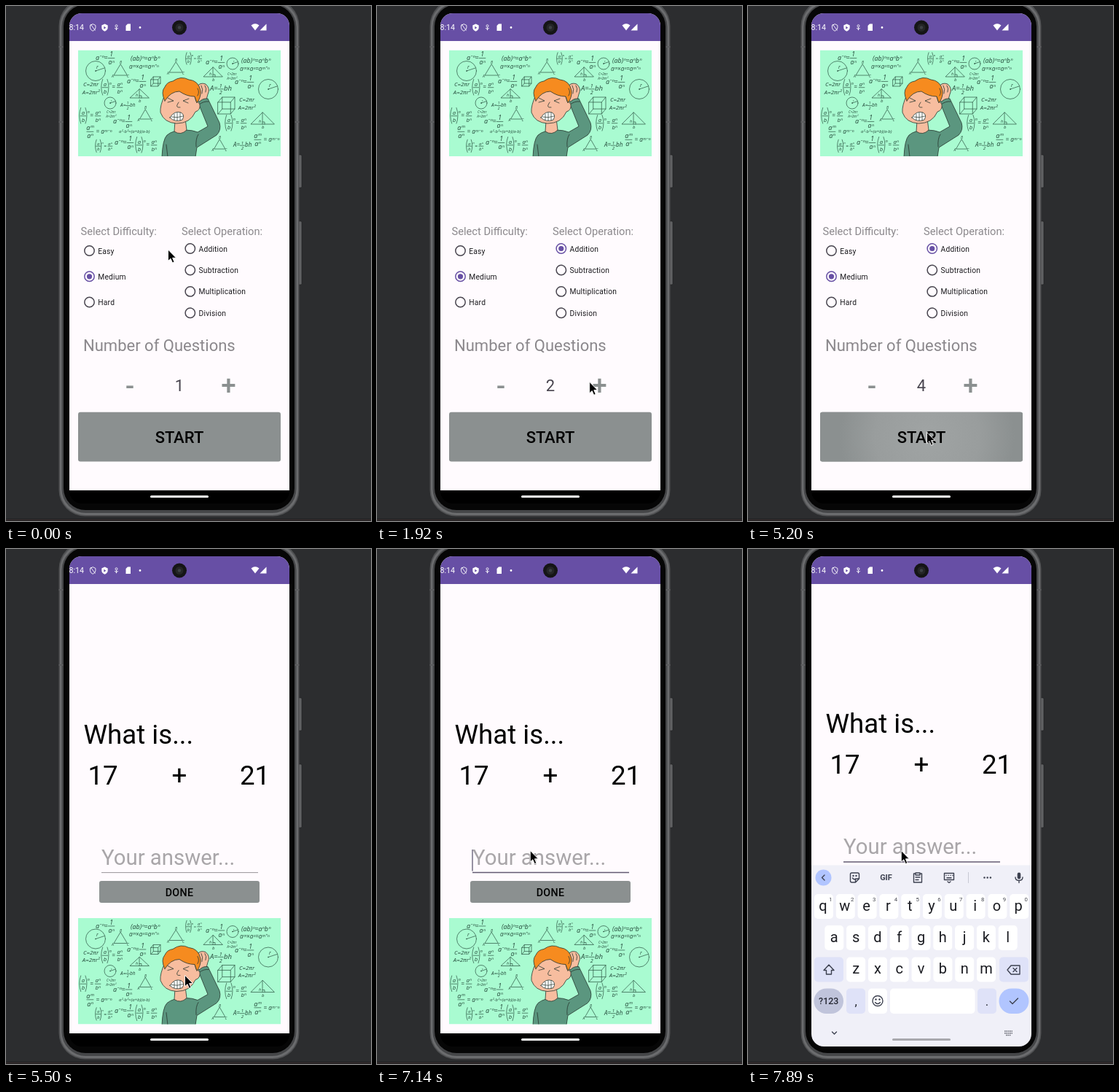
An HTML page that plays this animation: 501 px wide and 706 px high, repeating every 8 s.

```html
<!DOCTYPE html>
<html lang="en">
<head>
<meta charset="utf-8">
<title>Maths quiz</title>
<style>
html, body { margin: 0; width: 100%; height: 100%; overflow: hidden; background: #2c2d2f; }
svg { display: block; width: 501px; height: 706px; font-family: Roboto, sans-serif; }
.mid { text-anchor: middle; }
.m { font-weight: 500; }
.ink { fill: none; stroke: #2a5241; stroke-width: .7; stroke-linecap: round; stroke-linejoin: round; }
.hand { font-family: "Noto Sans", "DejaVu Sans", sans-serif; font-style: italic; font-weight: 300; fill: #2a5241; }
.icon { fill: none; stroke: #3d4150; stroke-width: 1.4; stroke-linecap: round; stroke-linejoin: round; }
.lab { font-size: 10.28px; letter-spacing: .18px; fill: #1c1b1f; }
</style>
</head>
<body>
<svg viewBox="0 0 501 706">
  <defs>
    <clipPath id="screen"><rect x="87" y="10" width="302" height="672" rx="17"/></clipPath>
    <clipPath id="frame"><rect x="99" y="60.5" width="278" height="145.5"/></clipPath>
    <radialGradient id="glow" gradientUnits="userSpaceOnUse" cx="246" cy="591" r="120">
      <stop offset="0" stop-color="#a0a4a4"/><stop offset=".6" stop-color="#999d9d"/><stop offset="1" stop-color="#8b9090"/>
    </radialGradient>
  </defs>

  <rect width="501" height="706" fill="#2c2d2f"/>
  <path d="M0 704.5H501" stroke="#0c0b0b" stroke-width="2"/>
  <path d="M0 704.5H501" stroke="#57494b" stroke-width=".7"/>
  <g fill="#606163" stroke="#1c1c1d" stroke-width=".6">
    <rect x="401" y="204" width="5" height="45" rx="1.5"/>
    <rect x="401" y="295" width="5" height="87" rx="1.5"/>
  </g>
  <rect x="72.500" y="-9" width="330" height="708.500" rx="36" fill="#505153"/>
  <rect x="74" y="-7" width="327" height="705" rx="35" fill="#6b6c6e"/>
  <rect x="76.500" y="-4" width="322" height="699" rx="33" fill="#454648"/>
  <path d="M72.500 56h6M72.500 159h6M396.500 56h6M396.500 159h6" stroke="#5c5d5f" stroke-width="2"/>
  <rect x="79" y="-2" width="317" height="693" rx="30" fill="#060606"/>

  <g clip-path="url(#screen)">
    <rect x="87" y="10" width="302" height="654" fill="#fffbfe"/>
    <g id="setup"></g>
    <g id="quiz"></g>
    <rect x="87" y="10" width="302" height="38" fill="#674fa5"/>
    <g fill="#fff">
      <text x="86.500" y="33" font-size="10.600">8:14</text>
      <path d="M131.300 26.500l4.200-2 4.200 2v3.300q0 3.200-4.200 5-4.200-1.800-4.200-5z"/>
      <path d="M164.500 27l2.500-2.500h4v9.500h-6.500z"/>
      <circle cx="184" cy="29.500" r="1.400"/>
      <path d="M336.500 26.500q5.500-4.500 11 0l-5.500 7z"/>
      <path d="M357.500 24.500v9h-9z"/>
    </g>
    <g fill="none" stroke="#fff" stroke-width=".9">
      <path d="M115.500 26.500l3.700-1.800 3.700 1.800v3.300q0 2.800-3.700 4.500-3.700-1.700-3.700-4.500zM116 25l6.500 8.500"/>
      <circle cx="151.500" cy="27.300" r="1.500"/>
      <path d="M149.300 30a2.300 2.300 0 0 0 4.400 0M151.500 29v4.300"/>
    </g>
    <path d="M134.300 27.800v4l3-2z" fill="#674fa5"/>
    <circle cx="238" cy="29.500" r="10" fill="#151516"/>
    <circle cx="238" cy="29.500" r="5.500" fill="#242526"/>
    <circle cx="238" cy="29.500" r="2.200" fill="#3c4044"/>
    <rect x="87" y="664" width="302" height="18" fill="#000"/>
    <g id="keys"></g>
    <rect id="pill" x="198" y="671" width="80" height="3" rx="1.500" fill="#fff"/>
  </g>
  <path id="cursor" d="M0 0V15.500L3.500 12.300 6 18 8.500 17 6.100 11.300H11Z" fill="#000" stroke="#fff" stroke-width=".9"/>
</svg>

<script>
const $ = id => document.getElementById(id);
const text = (x, y, size, str, attrs = '') => `<text x="${x}" y="${y}" font-size="${size}" ${attrs}>${str}</text>`;
const box = (x, y, w, h, r, fill) => `<rect x="${x}" y="${y}" width="${w}" height="${h}" rx="${r}" fill="${fill}"/>`;
const line = (d, attrs = 'class="ink"') => `<path d="${d}" ${attrs}/>`;
const ring = (x, y, r) => `<circle class="ink" cx="${x}" cy="${y}" r="${r}"/>`;

// Chalkboard formulas: x is the left edge, y the baseline
const hand = (x, y, s, str) => text(x, y, s, str, 'class="hand"');
const frac = (x, y, s, top, bottom) =>
  text(x, y - s * .55, s, top, 'class="hand mid"') + text(x, y + s * .72, s, bottom, 'class="hand mid"') +
  line(`M${x - s * .5} ${y - s * .3}h${s}`);
const inverse = (x, y, s = 9) => hand(x, y, s, 'a⁻ⁿ=') + frac(x + s * 2.4, y, s * .95, '1', 'aⁿ');
const ratio = (x, y, s = 9) =>
  line(`M${x + s * .3} ${y - s * 1.5}q${-s * .45} ${s * 1.2} 0 ${s * 2.4}M${x + s} ${y - s * 1.5}q${s * .45} ${s * 1.2} 0 ${s * 2.4}`) +
  frac(x + s * .65, y, s * .85, 'a', 'b') + hand(x + s * 1.3, y - s * .7, s * .6, 'n') +
  hand(x + s * 1.7, y, s * .9, '=') + frac(x + s * 2.9, y, s * .85, 'aⁿ', 'bⁿ');
const quotient = (x, y, s = 9) => frac(x + s * .6, y, s, 'aᵐ', 'aⁿ') + hand(x + s * 1.5, y, s * .9, '= aᵐ⁻ⁿ');
const half = (x, y, s) => hand(x, y, s, 'A=') + frac(x + s * 1.55, y, s * .75, '1', '2') + hand(x + s * 2, y, s, 'bh');
const powers = (x, y) => hand(x, y, 8.8, '(ab)ⁿ=aⁿbⁿ') + hand(x - 2, y + 10.5, 8, 'aᵐ×aⁿ=aᵐ⁺ⁿ');
const area = (x, y, s) => hand(x, y, s, 'C=2πr') + hand(x - s * .15, y + s * 1.35, s, 'A=2πr²');
const circle = (x, y, r) => ring(x, y, r) + line(`M${x} ${y}l${r * .9} ${-r * .3}`) + ring(x, y, .5) + hand(x + 1, y - r * .25, r * .5, 'r');
const triangle = (x, y, w, h) => line(`M${x} ${y}l${-w / 2} ${h}h${w}z`) +
  hand(x - 1, y - 1, 5, 'B') + hand(x - w / 2 - 3, y + h + 3, 5, 'A') + hand(x + w / 2, y + h + 3, 5, 'C');
const height = (x, y, w, h) => line(`M${x} ${y}l${-w / 2} ${h}h${w}zv${h}m0-3h3v3`) +
  hand(x - 5, y + h - 2, 5.5, 'h') + hand(x - 1, y + h + 6, 6, 'b');
const cube = (x, y, s) => line(`M${x} ${y + s * .3}h${s * .75}v${s * .7}h${-s * .75}zl${s * .25} ${-s * .3}h${s * .75}l${-s * .25} ${s * .3}m${s * .25} ${-s * .3}v${s * .7}l${-s * .25} ${s * .3}M${x + s * .25} ${y}v${s * .7}h${s * .75}M${x + s * .25} ${y + s * .7}l${-s * .25} ${s * .3}`);

const board = '<g clip-path="url(#frame)">' + box(99, 60.5, 278, 145.5, 0, '#a9fbd1') +
  inverse(123, 74) + circle(123, 89, 13.5) + area(106, 110, 7.8) + powers(171, 75) + triangle(157, 80, 18, 15) +
  ratio(130, 114) + inverse(166, 106) + cube(199, 97, 13) + triangle(233, 77, 18, 14) + ratio(246, 74, 6.8) +
  inverse(274, 80) + circle(311, 79, 8) + area(304, 95, 4.6) + powers(323, 78) + height(284, 84, 26, 13) +
  half(280, 116, 9.5) + inverse(314, 107) + circle(360, 114, 13.5) + cube(291, 125, 23) + area(320, 131, 7.8) +
  ratio(300, 163) + height(352, 146, 32, 16) + half(312, 193, 8) + quotient(340, 186) + triangle(293, 183, 15, 13) +
  circle(143, 133, 8) + area(138, 147, 4.6) + half(157, 138, 6.5) + height(183, 114, 26, 12) + inverse(147, 161) +
  triangle(191, 142, 15, 13) + ratio(100, 153) + quotient(110, 175) + hand(155, 174, 6, 'a²-b²=(a+b)(a-b)') +
  ratio(122, 194, 7.2) + inverse(149, 190) + ratio(177, 193) +
  `<g stroke="#28372f" stroke-width=".8" stroke-linejoin="round" stroke-linecap="round">
    <path fill="#f7bd9f" d="M262 130Q259 118 262 111Q266 104 274 107Q281 113 277 121L274 132Z"/>
    <path fill="#5b967f" d="M214 207Q215 183 221 177Q229 170 246 170Q256 170 263 173L277 165 264 133Q269 126 277 127L293 160Q296 170 289 177L262 194 260 207Z"/>
    <path fill="none" d="M264 176Q260 182 261 193M220 190l2 17M265 135q7-5 13-4"/>
    <path fill="#f7bd9f" d="M232 157L231 172Q240 178 248 170L246 154Z"/>
    <path fill="#f7bd9f" d="M218 122Q211 137 212 146Q217 160 234 161Q253 161 260 145Q267 143 266 135Q264 130 261 131L257 117 230 112Z"/>
    <path fill="#f68b1f" d="M218 130Q212 118 218 111Q221 104 229 103Q240 95 251 101Q264 102 267 116Q268 125 262 133L259 124Q248 124 238 117Q226 117 218 130Z"/>
    <path fill="none" d="M222 126l8 4-8 2M251 127l-8 3 7 3M237 132q-6 8 2 7M263 113q3 5 0 10M268 109q3 5 1 11M273 109q3 4 1 9"/>
    <path fill="#fff" d="M225 153Q231 143 240 146Q246 149 242 156Q232 160 225 153Z"/>
    <path fill="none" stroke-width=".7" d="M227 152q8 2 16-1M231 148v8M235 146v11M239 146v11"/>
  </g></g>`;

const radio = (x, y, label, id = '') => `<circle cx="${x}" cy="${y}" r="6.700" fill="none" stroke="#49454f" stroke-width="1.500" ${id && `id="${id}Ring"`}/>
  ${id ? `<circle id="${id}Dot" cx="${x}" cy="${y}" r="3.600" fill="#6750a4"/>` : ''}` + text(x + 11.8, y + 4, 10.28, label, 'class="lab"');

$('setup').innerHTML = board +
  text(102.5, 314, 14.68, 'Select Difficulty:', 'fill="#8b888c"') + text(241, 314, 14.68, 'Select Operation:', 'fill="#8b888c"') +
  radio(114.5, 335.5, 'Easy') + radio(114.5, 370.8, 'Medium', 'medium') + radio(114.5, 406, 'Hard') +
  radio(252.8, 332.5, 'Addition', 'add') +
  ['Subtraction', 'Multiplication', 'Division'].map((s, i) => radio(252.8, 362 + i * 29.4, s)).join('') +
  text(106, 472.5, 22.02, 'Number of Questions', 'fill="#8b888c"') +
  text(170, 532.6, 36.7, '-', 'class="mid m" fill="#8b9090"') + text(305.5, 532.8, 36.7, '+', 'class="mid m" fill="#8b9090"') +
  text(238, 527.5, 22.02, '1', 'class="mid" id="count" fill="#49454f"') +
  box(99, 556.8, 278, 67.7, 3, '#8b9090') +
  '<rect id="ripple" x="99" y="556.800" width="278" height="67.700" rx="3" fill="url(#glow)"/>' +
  text(238, 599.3, 22.02, 'START', 'class="mid m"');
$('mediumRing').setAttribute('stroke', '#6750a4');

$('quiz').innerHTML = `<g id="form">` +
  text(106.5, 267, 36.7, 'What is...') + text(112.5, 323, 36.7, '17') +
  text(238, 323, 36.7, '+', 'class="mid"') + text(321, 323, 36.7, '21') +
  text(131, 433, 29.36, 'Your answer...', 'fill="#a9a6a9"') +
  '<path id="rule" d="M131 443.600H346"/><path id="caret" d="M131 412V441.500" stroke="#5f5a72" stroke-width="1.300"/>' +
  box(128, 455, 220, 30, 3, '#8b9090') + text(238, 475.6, 14.2, 'DONE', 'class="mid m" letter-spacing=".35"') +
  `</g><g transform="translate(0 445.500)">${board}</g>`;

// Keyboard
const step = 29.8, soft = '#dfe2f8', blue = '#b1c5ff';
const row = (str, x, y, digits) => [...str].map((c, i) => {
  const cx = x + i * step;
  return box(cx - 13, y, 26, 34, 5, '#fff') + text(cx - (digits ? 1 : 0), y + 22.5, 20, c, 'class="mid" fill="#1b1c22"') +
    (digits ? text(cx + 9.5, y + 9.5, 7.8, (i + 1) % 10, 'class="mid" fill="#44464f"') : '');
}).join('');
const dots = (x, y, n, gap) => Array.from({ length: n }, (_, i) => `<circle cx="${x + i * gap}" cy="${y}" r="1.200" fill="#3d4150"/>`).join('');
const icon = d => line(d, 'class="icon"');

$('keys').innerHTML = box(87, 433.5, 302, 249, 0, '#f0f0f8') +
  `<circle cx="103.500" cy="450.500" r="11" fill="${blue}"/>` + icon('M105 447l-3.500 3.500 3.500 3.500') +
  icon('M140.500 446q0-2 2-2h8q2 0 2 2v6l-5 5h-5q-2 0-2-2zM147.500 457v-3q0-2 2-2h3M143.500 451q2 3 4 1') + dots(144.5, 448, 2, 4) +
  text(189.5, 454.3, 11, 'GIF', 'class="mid" font-weight="700" fill="#3d4150"') +
  icon('M230 445h-2.500v12h11v-12H236M230 444h6v3h-6zM230 450h6M230 453.500h4') +
  icon('M269.500 444.500h13v9h-13zM272 447.500h.1M275 447.500h.1M278 447.500h.1M281 447.500h-.1M273 450.800h6M274 456l2 1.500 2-1.500') +
  line('M302.500 443v15', 'stroke="#c8c9d4"') + dots(324.5, 450.5, 3, 4.2) +
  '<rect x="369.700" y="443.500" width="4.600" height="9" rx="2.300" fill="#3d4150"/>' + icon('M367 450q0 4.500 5 4.500 5 0 5-4.500M372 454.500v3') +
  row('qwertyuiop', 104, 473, true) + row('asdfghjkl', 118.3, 516) + row('zxcvbnm', 148.2, 559.5) +
  box(91, 559.5, 40, 34, 5, soft) + icon('M111 570l7 7.500h-3.500v5.500h-7v-5.500h-3.500z') +
  box(345, 559.5, 40, 34, 5, soft) + icon('M361 571h12v12h-12l-5-6zM364 574.500l5 5M369 574.500l-5 5') +
  box(90.5, 602.5, 40.5, 34.5, 17, '#c0c4db') + text(110.7, 624, 12.4, '?123', 'class="mid m" fill="#262934"') +
  box(135, 602.5, 26, 34.5, 5, soft) + text(148.2, 625.5, 17, ',', 'class="mid" fill="#262934"') +
  box(165, 602.5, 26, 34.5, 5, '#fff') + icon('M171 619.500a7 7 0 1 0 14 0a7 7 0 1 0-14 0M174.500 621.500q3.500 4 7 0') + dots(175.5, 617.5, 2, 5) +
  box(195, 602.5, 116.5, 34.5, 5, '#fff') +
  box(315, 602.5, 26, 34.5, 5, soft) + text(328, 625.5, 17, '.', 'class="mid" fill="#262934"') +
  box(344.5, 602.5, 41, 34.5, 17, blue) + icon('M359.500 620l3.500 3.500 7.500-7.500') +
  icon('M115.500 662l3 3 3-3') +
  line('M352 661h11M352 663.800h11M354 666.600h7', 'stroke="#6a6c76" stroke-width="1.500" stroke-dasharray="1.700 .7"');

// Pointer moves: start, end, step count, tip position
const moves = [
  [140, 730, 5, 280, 324],
  [1030, 1620, 5, 291.7, 515.3],
  [4170, 4760, 5, 245.5, 584.3],
  [5950, 6690, 6, 210.3, 413.5]
];
const ease = p => p * p * (3 - 2 * p);
function pointer(t) {
  let x = 222.5, y = 334;
  for (const [from, to, n, tx, ty] of moves) {
    if (t < from) break;
    const k = Math.min(n, Math.floor((t - from) / ((to - from) / (n - 1)) + .02) + 1);
    const p = ease(k / n);
    x += (tx - x) * p;
    y += (ty - y) * p;
  }
  return [x, y];
}

const show = (id, on) => $(id).setAttribute('visibility', on ? 'inherit' : 'hidden');
function draw(now) {
  const t = now % 8000, quiz = t >= 5500, focus = t >= 6990, added = t >= 1030;
  $('cursor').setAttribute('transform', `translate(${pointer(t)})`);
  show('setup', !quiz);
  show('quiz', quiz);
  show('addDot', !quiz && added);
  $('addDot').setAttribute('r', t < 1180 ? 2.2 : 3.6);
  $('addRing').setAttribute('stroke', added ? '#6750a4' : '#49454f');
  $('count').textContent = 1 + (t >= 1920) + (t >= 2820) + (t >= 3420);
  show('ripple', t >= 5200 && !quiz);
  $('rule').setAttribute('stroke', focus ? '#625b71' : '#8d898e');
  $('rule').setAttribute('stroke-width', focus ? 1.5 : .9);
  show('caret', t >= 7140 && t < 7590);
  $('form').setAttribute('transform', `translate(0 ${t >= 7440 ? -14.7 : 0})`);
  const rise = t < 7290 ? 0 : t < 7440 ? .45 : t < 7590 ? .9 : 1;
  show('keys', rise > 0);
  $('keys').setAttribute('transform', `translate(0 ${249 * (1 - rise)})`);
  $('pill').setAttribute('fill', t >= 7890 ? '#a9a9ae' : '#fff');
}
const start = performance.now();
function tick() {
  draw(performance.now() - start);
  requestAnimationFrame(tick);
}
tick();
</script>
</body>
</html>
```
